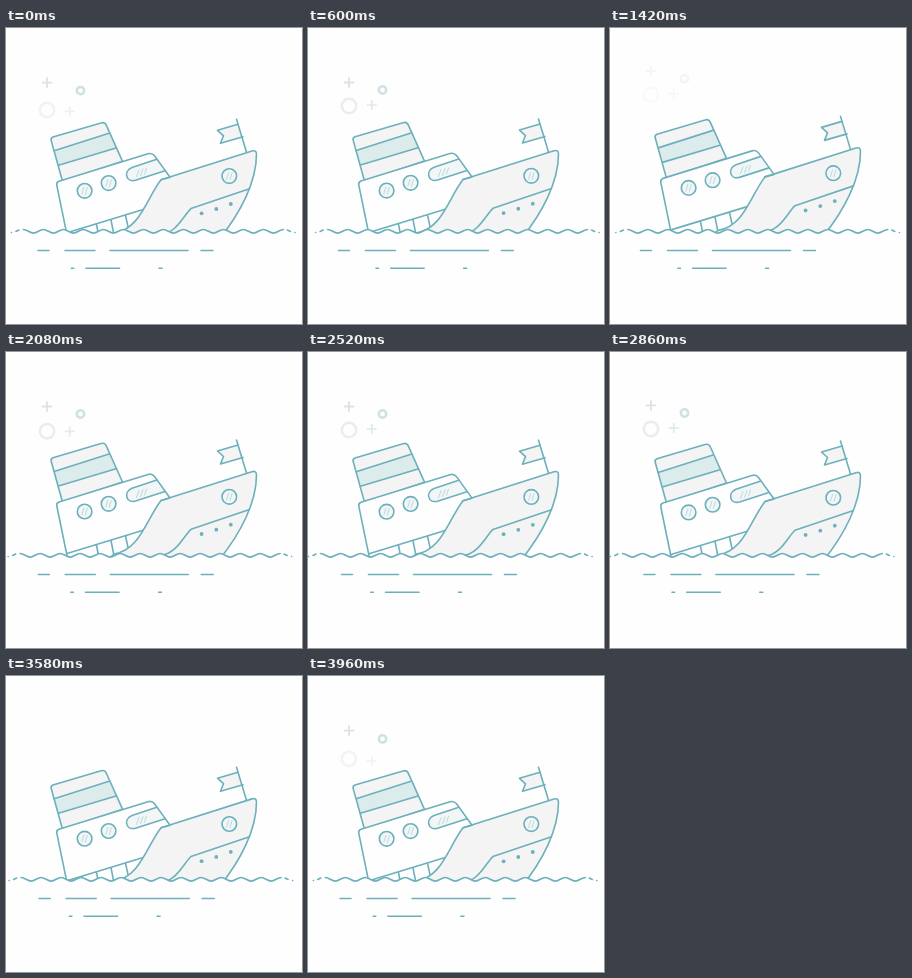
Write an HTML page that moves like this. It is 296 px wide and 296 px high and loops after 3980 ms.

```html
<!DOCTYPE html>
<html lang="en">
<head>
<meta charset="utf-8">
<title>Ship at sea</title>
<style>
html, body { margin: 0; width: 100%; height: 100%; overflow: hidden; background: #fefefe; }
svg { display: block; width: 100vw; height: 100vh; }
.line { fill: none; stroke: #6cb0bc; stroke-width: 1.6; stroke-linecap: round; stroke-linejoin: round; }
.glass { fill: #f2f6f6; }
.glare { stroke: #b3d6dc; stroke-width: .9; }
.white { fill: #fefefe; }
.grey { fill: #f4f4f4; }
.band { fill: #dcebec; stroke: none; }
.bubble { fill: none; stroke-linecap: round; }
</style>
</head>
<body>
<svg viewBox="0 0 296 296">
  <defs>
    <g id="port">
      <circle class="line glass" r="7.3"/>
      <path class="line glare" d="M-2.7 3.2L-.7-3.5M.7 3.5L2.7-3.2"/>
    </g>
    <path id="funnel" d="M56.500 153L45.200 112.300Q44.500 109.800 47 108.800L95 94.600Q99 93.300 100.500 97.300L116.500 133Z"/>
  </defs>

  <g id="bubbles" class="bubble">
    <path d="M-4.500 0H4.500M0-4.500V4.500" stroke="#dbe3e4" stroke-width="1.800"/>
    <circle r="3.700" stroke="#cfe1e3" stroke-width="2.500"/>
    <circle r="7.200" stroke="#ebeded" stroke-width="2.500"/>
    <path d="M-4.300 0H4.300M0-4.300V4.300" stroke="#e2e8e9" stroke-width="1.700"/>
  </g>

  <g id="ship" class="line">
    <!-- funnel -->
    <use href="#funnel" class="grey" stroke="none"/>
    <path class="band" d="M48.200 122.500L103 105L110 119.800L52.500 137Z"/>
    <path d="M48.200 122.500L103 105M52.500 137L110 119.800"/>
    <use href="#funnel"/>
    <!-- cabin -->
    <path class="white" d="M61.500 209L50.800 157Q50.200 154 53 153L142 125.500Q146 124.300 148.500 127.500L164 149L134 190L110 212Z"/>
    <path d="M61 204.500L138 181M90.500 196L93.500 212M105 191.500L109 212M119.500 187L123 203"/>
    <path class="glass" stroke="none" d="M150.300 131.500L126 139.300C117 143 120 154.500 129.500 152L158 143Z"/>
    <path d="M150.800 131L126 139.300C117 143 120 154.500 129.500 152L159 142.500"/>
    <path class="glare" d="M130.500 148.500L133 141.500M134.500 147.500L137 140.500M138.500 146L140.500 140"/>
    <use href="#port" x="78.600" y="162.500"/>
    <use href="#port" x="102.600" y="154.800"/>
    <!-- flag -->
    <path class="grey" d="M232 96L211.500 102L217.500 107.500L214.500 115L237 108.500"/>
    <path d="M230.500 91L240.500 124"/>
    <!-- hull -->
    <path class="grey" d="M155 151.500L246 122.700Q250.500 121.300 250.500 126C250.500 153 235 184 213 211L100 212L108 205C134 201 140 171 155 151.500Z"/>
    <path d="M155 151.500L164 149M243.500 160.500L185 180.300C177 188 171 204 155 206.500"/>
    <use href="#port" x="223.300" y="147.800"/>
    <g fill="#6cb0bc" stroke="none">
      <circle cx="195.600" cy="185" r="1.900"/>
      <circle cx="210.300" cy="180.700" r="1.900"/>
      <circle cx="224.800" cy="175.700" r="1.900"/>
    </g>
  </g>

  <rect class="white" y="205.500" width="296" height="91"/>
  <g id="wave">
    <path id="sea" class="white"/>
    <path id="crest" class="line"/>
    <path class="line" d="M4 204.500h.1M8.500 203.500L11.500 202M280 202L283 203.500M287.500 204.500h.1"/>
  </g>
  <path id="near" class="line" d="M32 222.500h11M59 222.500h30M104 222.500h78M195 222.500h12"/>
  <path id="far" class="line" d="M65.300 240.300h2.500M80 240.300h33.500M153 240.300h3"/>
</svg>
<script>
const LOOP = 3980, BUBBLE_LOOP = LOOP / 2;
const $ = id => document.getElementById(id);
const swing = (t, peak) => Math.cos((t - peak) / LOOP * 2 * Math.PI);
const clamp = x => Math.max(0, Math.min(1, x));
const move = (el, x, y) => el.setAttribute('transform', `translate(${x} ${y})`);

const ripple = 'M16 201.500' + 'c3.640 0 6.360 3.600 10 3.600s6.360 -3.600 10 -3.600'.repeat(13);
$('crest').setAttribute('d', ripple);
$('sea').setAttribute('d', ripple + 'V220H16Z');

// x, resting y, entry delay, entry rise
const bubbles = [[41, 54.5, 0, 14], [74.5, 62, 60, 17], [41, 78, 180, 20], [63.8, 77, 210, 24]];

function drawBubbles(t) {
  const age = (t + 380) % BUBBLE_LOOP;
  bubbles.forEach(([x, y, delay, rise], i) => {
    const enter = clamp((age - delay) / 480);
    const leave = clamp((age - 1110) / 800);
    const dy = rise * (1 - enter) ** 3 - 14 * leave ** 1.5;
    const el = $('bubbles').children[i];
    move(el, x, y + dy);
    el.setAttribute('opacity', clamp(enter * 1.7) * clamp((1 - leave) * 2.2));
  });
}

function draw(now) {
  const t = now % LOOP;
  const bob = Math.sin(swing(t, 50) * Math.PI / 2);
  move($('ship'), 0, 1.65 * (bob - 1) + .3);
  move($('wave'), 3.7 * swing(t, 750), 0);
  move($('near'), -2 * swing(t, 995), 0);
  move($('far'), 3.3 * swing(t, 995), 0);
  drawBubbles(t);
}

const start = performance.now();
function tick() {
  draw(performance.now() - start);
  requestAnimationFrame(tick);
}
tick();
</script>
</body>
</html>
```
